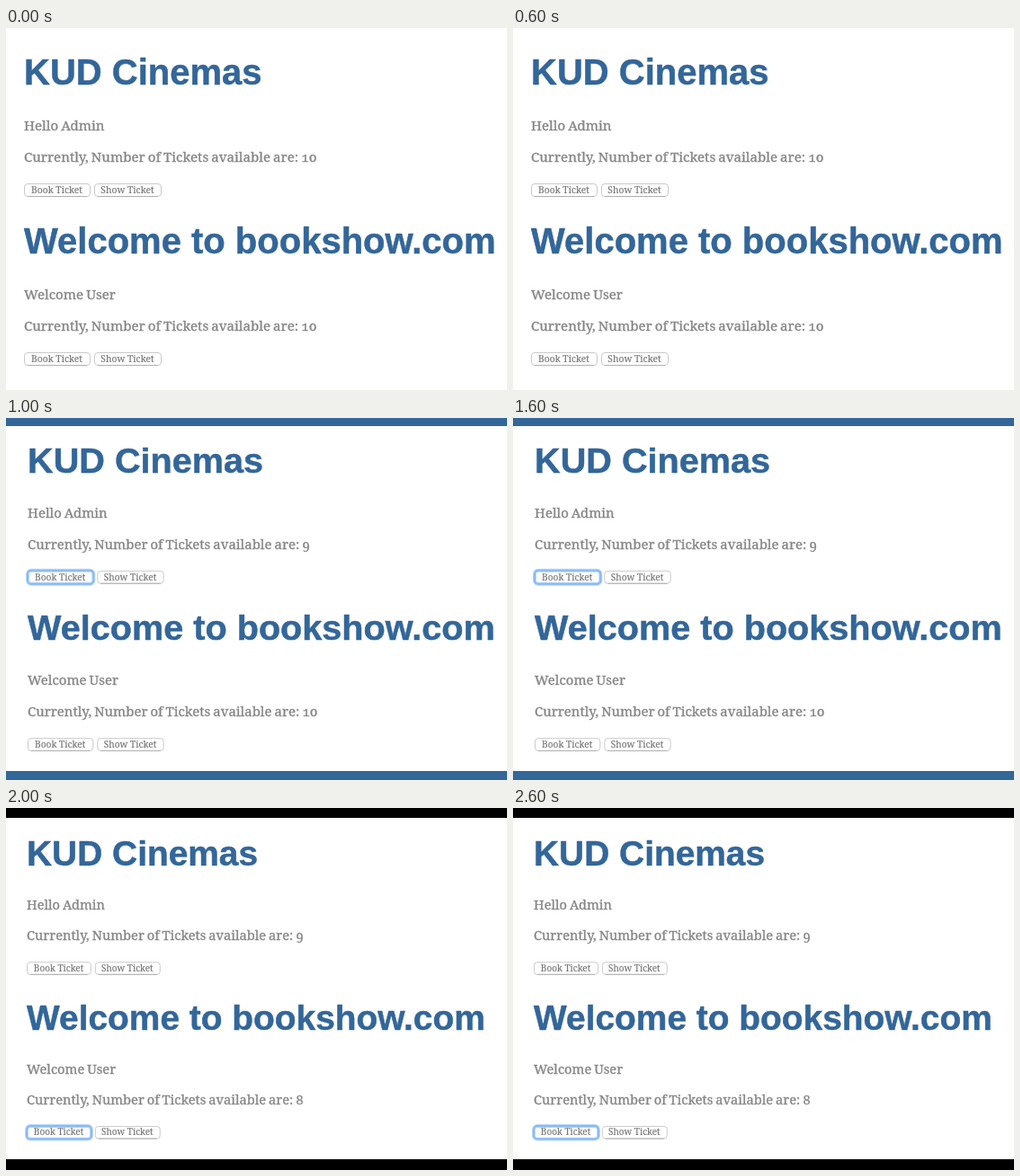
Recreate the animation shown at these times as an HTML page. Size 557 by 403 pixels, loop 3000 ms.

```html
<!DOCTYPE html>
<html>
<head>
<meta charset="utf-8">
<style>
html, body { margin: 0; width: 100%; height: 100%; overflow: hidden; background: #fff; }
svg { display: block; width: 557px; height: 403px; }
text { font-family: "Noto Serif", serif; font-variant-numeric: oldstyle-nums; white-space: pre; }
.title { font: bold 40px "Liberation Sans", Arial, sans-serif; fill: #336699; stroke: #336699; stroke-width: .5px; }
.line { font-size: 15.1px; word-spacing: -.9px; fill: #868686; stroke: #868686; stroke-width: .35px; }
.label { font-size: 10.3px; fill: #757575; stroke: #757575; stroke-width: .15px; text-anchor: middle; }
</style>
</head>
<body>
<svg id="stage" viewBox="0 0 557 403"></svg>
<script>
const stage = document.getElementById("stage");
const scenes = [
  { x: 0, y: 0, scale: 1, tickets: [10, 10] },
  { x: 4.2, y: -1.6, scale: .991, tickets: [9, 10], focus: 0, bar: "#336699", top: 9, bottom: 393 },
  { x: 3.6, y: 3.1, scale: .972, tickets: [9, 8], focus: 1, bar: "#000", top: 11, bottom: 391 }
];

const text = (kind, x, y, value) => `<text class="${kind}" x="${x}" y="${y}">${value}</text>`;

function button(x, y, width, label, focused) {
  const box = (grow, style) => `<rect x="${x + .5 - grow}" y="${y + .5 - grow}" width="${width - 1 + 2 * grow}"
    height="${14 + 2 * grow}" rx="${3.5 + grow}" ${style}/>`;
  const frame = focused
    ? box(.5, 'fill="#fff" stroke="#b5d6fa" stroke-width="4"') + box(.5, 'fill="none" stroke="#8abaf3" stroke-width="2"')
    : box(0, 'fill="#fff" stroke="#cacaca"') +
      `<path d="M${x + 4} ${y + 14.5}h${width - 8}" stroke="#b0b0b0"/>`;
  return frame + text("label", x + width / 2 - .5, y + 10.8, label);
}

function panel(y, title, greeting, tickets, focused) {
  return `<g transform="translate(20 ${y})">` +
    text("title", 0, 0, title) +
    text("line", 0, 50.5, greeting) +
    text("line", 0, 85.5, `Currently, Number of Tickets available are: ${tickets}`) +
    button(0, 110, 74, "Book Ticket", focused) +
    button(78, 110, 75, "Show Ticket", false) + "</g>";
}

function render({ x, y, scale, tickets, focus, bar, top, bottom }) {
  const bars = bar ? `<path fill="${bar}" d="M0 0h557v${top}H0zM0 ${bottom}h557V403H0z"/>` : "";
  return `<g transform="translate(${x} ${y}) scale(${scale})">` +
    panel(63, "KUD Cinemas", "Hello Admin", tickets[0], focus === 0) +
    panel(251, "Welcome to bookshow.com", "Welcome User", tickets[1], focus === 1) + "</g>" + bars;
}

let shown = -1;
function tick() {
  const index = Math.floor(performance.now() % 3000 / 1000);
  if (index !== shown) stage.innerHTML = render(scenes[shown = index]);
  requestAnimationFrame(tick);
}
tick();
</script>
</body>
</html>
```
